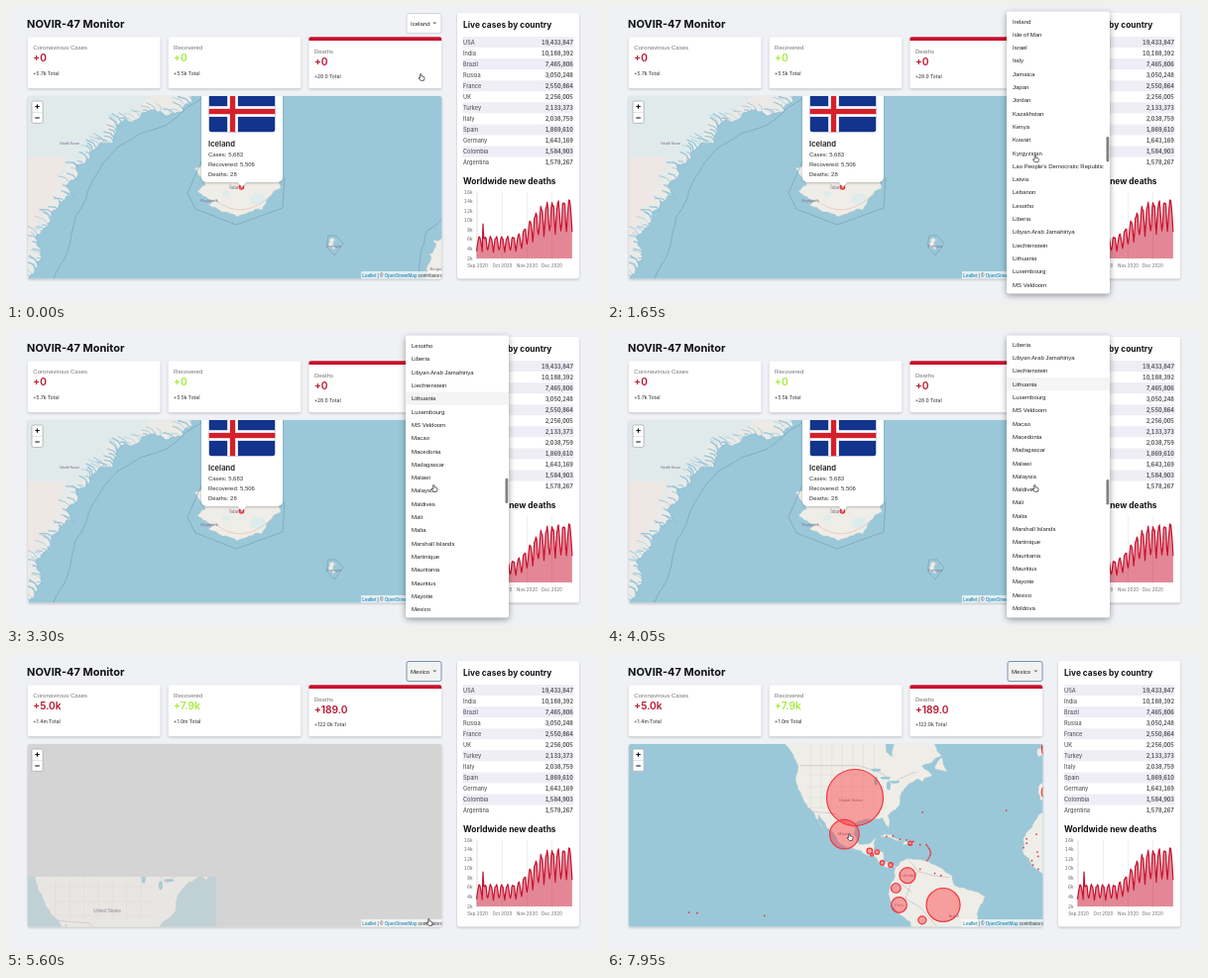
An HTML page that plays this animation: 600x299 px, repeating every 8000 ms.

```html
<!DOCTYPE html>
<html lang="en">
<head>
<meta charset="utf-8">
<title>Case dashboard</title>
<style>
html, body { margin: 0; width: 100%; height: 100%; overflow: hidden; background: #eff1f5; }
svg { display: block; width: 600px; height: 299px; }
text { font-family: "Liberation Sans", Arial, sans-serif; white-space: pre; }
.ui { font-family: Inter, sans-serif; }
.count { font-variant-numeric: tabular-nums; text-anchor: end; }
.card { fill: #fff; filter: drop-shadow(0 1px 1px rgba(0,0,0,.22)); }
.land { fill: #efede7; stroke: #b4c4c6; stroke-width: .4; }
.lake { fill: #9ac8d9; }
.sealine { fill: none; stroke: #7898ac; stroke-width: .6; }
.state { fill: none; stroke: #dbd4d7; stroke-width: .4; }
.border { fill: none; stroke: #b9a8b8; stroke-width: .5; }
.place { fill: #7d6884; text-anchor: middle; }
.spot { fill: #ff3038; fill-opacity: .42; stroke: #f0353c; stroke-width: 1.2; }
.dot { fill: #e3383f; }
.hidden { display: none; }
</style>
</head>
<body>
<svg id="stage" viewBox="0 0 600 299"></svg>
<script>
const LOOP = 8000, ROW = 13.3, SEA = '#9ac8d9', RED = '#c8102e';
const clamp = v => Math.min(1, Math.max(0, v));
const smooth = v => (v = clamp(v), v * v * (3 - 2 * v));
const span = (t, from, to) => clamp((t - from) / (to - from));
const times = (n, fn) => Array.from({ length: n }, (_, i) => fn(i)).join('');

function seeded(seed) {
  return () => (seed = (seed * 16807) % 2147483647) / 2147483647;
}

const rect = (x, y, w, h, fill, extra = '') =>
  `<rect x="${x}" y="${y}" width="${w}" height="${h}" fill="${fill}" ${extra}/>`;
const text = (x, y, str, size, fill = '#333', extra = '') =>
  `<text x="${x}" y="${y}" font-size="${size}" fill="${fill}" ${extra}>${str}</text>`;
const ui = (x, y, str, size, fill, weight = 400, cls = '', extra = '') =>
  text(x, y, str, size, fill, `class="ui ${cls}" font-weight="${weight}" ${extra}`);
const place = ([x, y], str, size = 4) => text(x, y + 1.4, str, size, '', 'class="place"');
const dot = ([x, y]) => `<circle class="dot" cx="${x}" cy="${y}" r=".9"/>`;
const line = (pts, cls, extra = '') => `<polyline points="${pts.join(' ')}" class="${cls}" ${extra}/>`;
const parse = str => str.split(' ').map(p => p.split(',').map(Number));

// Web Mercator view that puts longitude lon0 and latitude lat0 at x0, y0.
function mercator(scale, lon0, lat0, x0, y0) {
  const psi = lat => Math.log(Math.tan(Math.PI / 4 + lat * Math.PI / 360)) * 180 / Math.PI;
  return ([lon, lat]) => [x0 + (lon - lon0) * scale, y0 - (psi(lat) - psi(lat0)) * scale];
}

// Breaks a plain outline into a natural looking coast.
function rough(pts, amount = .15, depth = 3) {
  const rnd = seeded(41 + pts.length);
  for (let k = 0; k < depth; k++) {
    pts = pts.flatMap((p, i) => {
      const q = pts[i + 1];
      if (!q) return [p];
      const shift = (rnd() - .5) * amount * 2;
      const dx = q[0] - p[0], dy = q[1] - p[1];
      return [p, [(p[0] + q[0]) / 2 - dy * shift, (p[1] + q[1]) / 2 + dx * shift]];
    });
  }
  return pts.map(p => p.map(v => +v.toFixed(1)));
}
const land = (pts, amount, extra = '') =>
  `<polygon class="land" points="${rough(pts, amount).join(' ')}" ${extra}/>`;

function fjords(coast) {
  const rnd = seeded(77);
  return coast.map(([x, y]) => {
    const dx = 3 + rnd() * 10, dy = 2 + rnd() * 9;
    return line([[x + 1, y + 1], [x + 2 - dx / 2, y - 1 - dy / 2], [x - dx, y - dy]], '',
      `fill="none" stroke="#97c5da" stroke-width="${.5 + rnd()}"`);
  }).join('');
}

function popup() {
  const u = 2.67, flagX = 204.5, crossX = flagX + 7 * u, crossY = 101.2;
  return '<g class="card"><rect x="197" y="80" width="82" height="98" rx="5"/><path d="M233 177h10l-5 6z"/></g>' +
    `<g clip-path="url(#flagClip)">${rect(flagX, 84, 67, 44, '#13348c')}
      ${rect(flagX, crossY, 67, 4 * u, '#fff')}${rect(crossX, 84, 4 * u, 44, '#fff')}
      ${rect(flagX, crossY + u, 67, 2 * u, '#d5202b')}${rect(crossX + u, 84, 2 * u, 44, '#d5202b')}</g>` +
    ui(204, 141.6, 'Iceland', 7.6, '#333', 700) +
    ['Cases: 5,683', 'Recovered: 5,506', 'Deaths: 28'].map((s, i) => text(204, 151.6 + i * 10, s, 5.95)).join('');
}

function icelandMap() {
  const coast = rough(parse('190,84 152,107 111,121 91,144 71,166 46,211 35,246 20,278'), .3, 5);
  const ice = rough(parse('150,86 104,112 62,160 38,212 20,240'));
  const island = parse('190,164 235,157 271,169 277,184 258,206 233,213 204,201 211,196 193,187 201,181 190,164');
  const faroe = parse('326,236 333,236 331,246 326,236');
  return rect(22, 91, 418, 185, SEA) +
    `<polygon points="20,86 ${coast.join(' ')}" fill="#ebeae6"/>` +
    `<polygon points="20,86 ${ice.join(' ')}" fill="#e0eaeb"/>` +
    '<path d="M20 153h42L34 216l-14 22z" fill="#eee7e3"/>' +
    fjords(coast.filter((_, i) => i % 3 === 0)) +
    line(coast, '', 'fill="none" stroke="#8cbdd4" stroke-width=".8"') +
    line(rough(parse('205,86 112,143 70,213 47,278'), .06), 'sealine') +
    place([64, 139], 'Kalaallit Nunaat', 2.8) +
    land(island) +
    '<g fill="#dfecec"><ellipse cx="254" cy="195" rx="8" ry="6"/><ellipse cx="222" cy="190" rx="4" ry="3"/></g>' +
    '<path d="M211 196q27 22 57-5" fill="none" stroke="#e6b9a4" stroke-width=".6"/>' +
    line(parse('198,155 183,189 191,205 232,221 279,204 281,173'), 'sealine') +
    place([205, 196.5], 'Reykjavík') + place([232, 184], 'Ísland', 5) +
    land(faroe, .3) + '<path class="sealine" d="M325 232h8l7 8-9 12-8-9z"/>' + place([331, 243], 'Føroyar') +
    land(parse('442,226 431,236 427,250 430,280 442,280'), .3) +
    line(rough(parse('440,214 425,226 416,278'), .08), 'sealine') + place([434, 266], 'Bergen') +
    '<circle cx="237.5" cy="183" r="2.2" class="spot"/>' + popup();
}

// Coasts as longitude,latitude key points.
const COASTS = [
  '-134,58 -130,55 -124,49 -124,41 -117,32.5 -110,23 -114.5,31.5 -105.5,20.5 -95,15.8 -87.5,13 -83,8.3 -77.5,8 -83.5,11 -83.5,15 -88,16 -87,21.4 -91,18.7 -95,18.5 -97.6,23 -97,28 -89,29.3 -84,30 -81,25.2 -81.3,31 -75.7,35.3 -74,40.5 -67,44.7 -65,43.6 -60,46 -65,49 -60,50.2 -55.7,52 -62,58 -77,58 -79,51.5 -82,53 -83,58',
  '-77.5,8 -72,12 -62,10.5 -51,4 -50,0 -44,-2.5 -35,-6 -39,-14 -41,-24 -70,-24 -70.5,-18 -76,-14 -81,-5 -80,0 -77.5,8',
  '-5,35.5 -9.8,31 -17,21 -17,14.5 -13,9 -7.5,4.5 -5,5',
  '-6,43.5 -9,43 -9,37 -6,36.5', '-6,54.5 -10,54 -10,51.6 -6,52', '-59,48 -55.5,51.5 -53,47',
  '-85,22 -80,23 -74.5,20.2 -80,21.5', '-74,19.5 -68.5,18.6 -74,18.2'
].map(parse);
const LAKES = parse('-87,47.6 -87,44 -82.5,45 -81,42.3 -78,43.6');
const BORDERS = ['-123,49 -95,49 -84,46.5 -79,43 -75,45 -68,47', '-117,32.5 -106,31.7 -103,29 -97,26',
  '-72,12 -67,6 -70,1 -73,-7 -66,-11 -58,-20', '-80,-3 -75,0 -70,-4', '-67,6 -60,4 -52,3'].map(parse);

function americas(view) {
  const stroke = (pts, cls) => line(pts.map(view), cls);
  return COASTS.map(c => land(c.map(view), .12)).join('') +
    times(7, i => stroke([[-118 + i * 5, 33], [-118 + i * 5, 56]], 'state')) +
    times(4, i => stroke([[-120, 34 + i * 4], [-82, 34 + i * 4]], 'state')) +
    BORDERS.map(b => stroke(b, 'border')).join('') +
    LAKES.map((p, i) => {
      const [x, y] = view(p);
      return `<ellipse class="lake" cx="${x}" cy="${y}" rx="${i % 2 ? 2 : 5}" ry="${i % 2 ? 4.5 : 1.4}"/>`;
    }).join('');
}

// longitude,latitude,radius
const CASES = parse('-97,38,28.5 -102,23,14.8 -55,-10,17 -72,4,8 -76,-10,7.8 -77.5,-2,4.8 -65,-17,4 -90,15.5,2.8 -86.5,15,2.3 -88.9,13.8,1.5 -84,10,2.2 -80,9,2.4 -70.7,19,2 -4,40,9 -2,54,13');

function caseMap() {
  const view = mercator(2.12, -97, 38, 250, 145);
  const rnd = seeded(15);
  const label = (lon, lat, name) => place(view([lon, lat]), name);
  return rect(22, 91, 418, 185, SEA) + americas(view) +
    label(-99, 37.2, 'United States') + label(-102, 23.2, 'México') + label(-72, 4, 'Colombia') +
    label(-76, -10, 'Perú') + label(-50, -15, 'Brasil') +
    CASES.map(c => {
      const [x, y] = view(c);
      return `<circle class="spot" cx="${x}" cy="${y}" r="${c[2]}"/>`;
    }).join('') +
    times(10, i => dot(view([-63 + 2 * Math.sin(i / 3), 18.3 - i * .8]))) +
    times(6, i => dot(view([-82 + i * 3.2, 22 - i * .8 + rnd()]))) +
    times(9, i => dot(view([-17 + rnd() * 9, 23 - i * 2]))) +
    parse('-64.8,32.3 -25,33 -66,7 -59,5 -56,4 -176,-13.5 -172,-13.8 -140,-15').map(p => dot(view(p))).join('');
}

function loadingMap() {
  const view = mercator(2.87, -97, 38, 110, 250);
  return rect(22, 91, 418, 185, '#d4d4d4') +
    `<g id="tile" clip-path="url(#tileClip)">${rect(22, 225, 190, 51, '#b9d0d5')}${americas(view)}
    ${place([102, 260], 'United States', 4.6)}</g>`;
}

function chart() {
  const days = 120, yOf = v => 255 - (v - 2) * 67 / 14;
  const pts = Array.from({ length: days }, (_, d) => {
    const mean = 5 + 5.4 * smooth((d - 45) / 45) + Math.max(0, d - 90) * .02;
    const weekly = 1 - 2 * Math.cos(Math.PI * (d - days + 1) / 7) ** 4;
    const value = d === 8 ? 9.3 : mean * (1 + .29 * weekly + .05 * Math.sin(d * 2.3));
    return [(474.5 + d * .81).toFixed(1), yOf(value).toFixed(1)];
  });
  const months = ['Sep', 'Oct', 'Nov', 'Dec'].map((m, i) => {
    const x = 475.5 + i * 25;
    return rect(x, 188, .5, 69, '#dedede') + ui(x, 263.5, `${m} 2020`, 4.5, '#666', 400, '', 'text-anchor="middle"');
  }).join('');
  const scale = times(8, i => ui(470.5, yOf(2 + 2 * i) + 1.5, `${2 + 2 * i}k`, 4.7, '#666', 400, 'count'));
  return months + scale + rect(474, 188, .5, 67, '#ddd') +
    `<polygon points="474.5,255 ${pts.join(' ')} 570.9,255" fill="${RED}" fill-opacity=".5"/>` +
    line(pts, '', `fill="none" stroke="${RED}" stroke-width="1.2" stroke-linejoin="round"`);
}

function sidePanel() {
  const rows = ['USA 19,433,847', 'India 10,188,392', 'Brazil 7,465,806', 'Russia 3,050,248', 'France 2,550,864', 'UK 2,256,005', 'Turkey 2,133,373', 'Italy 2,038,759', 'Spain 1,869,610', 'Germany 1,643,169', 'Colombia 1,584,903', 'Argentina 1,578,267'];
  return '<rect class="card" x="455" y="7" width="123" height="268.5" rx="2"/>' +
    ui(461, 21.8, 'Live cases by country', 8.4, '#111', 700) +
    rows.map((row, i) => {
      const [name, count] = row.split(' '), y = 36.5 + i * 11.06;
      return (i % 2 ? '' : rect(460.5, y - 5.5, 112, 11, '#efeef6')) +
        ui(461, y + 2, name, 5.6, '#55595e', 500) + ui(572, y + 2, count, 5.6, '#55595e', 700, 'count');
    }).join('') +
    ui(461, 179.8, 'Worldwide new deaths', 8.4, '#111', 700) + chart();
}

const STATS = [
  { name: 'Coronavirous Cases', color: '#b8152f', before: ['+0', '+5.7k'], after: ['+5.0k', '+1.4m'] },
  { name: 'Recovered', color: '#a4ec3c', before: ['+0', '+5.5k'], after: ['+7.9k', '+1.0m'] },
  { name: 'Deaths', color: '#b8152f', active: true, before: ['+0', '+28.0'], after: ['+189.0', '+122.0k'] }
];
const statCards = STATS.map(({ name, color, active }, i) => {
  const x = 21.8 + i * 141.8, dy = active ? 3.6 : 0;
  return `<rect class="card" x="${x}" y="31.3" width="133.8" height="52" rx="2"/>` +
    (active ? `<path d="M${x} 35v-1.9q0-1.8 2-1.8h129.8q2 0 2 1.8v1.9z" fill="${RED}"/>` : '') +
    text(x + 5.5, 44.1 + dy, name, 6.05, '#757575') +
    ui(x + 5.5, 56.1 + dy, '', 10.2, color, 600, '', `id="new${i}"`) +
    ui(x + 5.5, 69.8 + dy, '', 4.9, '#55595e', 600, '', `id="total${i}"`);
}).join('');

const COUNTRIES = `Guadeloupe|Guatemala|Guinea|Guinea-Bissau|Guyana|Haiti|Holy See (Vatican City State)|Honduras|Hong Kong|Hungary|Iceland|India|Indonesia|Iran|Iraq|Ireland|Isle of Man|Israel|Italy|Jamaica|Japan|Jordan|Kazakhstan|Kenya|Kuwait|Kyrgyzstan|Lao People's Democratic Republic|Latvia|Lebanon|Lesotho|Liberia|Libyan Arab Jamahiriya|Liechtenstein|Lithuania|Luxembourg|MS Veldoorn|Macao|Macedonia|Madagascar|Malawi|Malaysia|Maldives|Mali|Malta|Marshall Islands|Martinique|Mauritania|Mauritius|Mayotte|Mexico|Moldova|Monaco`.split('|');
const rowTop = i => 14.2 + (i - .5) * ROW;

const menu = `<g id="menu"><rect x="403" y="5.5" width="104" height="285" rx="2" fill="#fff"
    style="filter:drop-shadow(0 2px 3px rgba(0,0,0,.38))"/>
  <g clip-path="url(#menuClip)"><g id="list">
    ${rect(403, rowTop(COUNTRIES.indexOf('Iceland')), 104, ROW, '#ebebeb')}
    ${rect(403, 0, 104, ROW, '#f4f4f4', 'id="hover"')}
    ${COUNTRIES.map((c, i) => text(409, rowTop(i) + 8.8, c, 6.02, '#212121')).join('')}
  </g></g>${rect(503.5, 113, 2.8, 25.5, '#808080', 'rx="1.4" id="thumb"')}</g>`;

const cursor = `<g id="cursor">
  <path id="hand" d="M-1.3-3.2q.8-.9 1.3.1v1.9l2.2.5q1 .4.8 1.6l-.6 2.4h-3.2l-2-2.3q-.3-1 .8-.7l.7.5z" fill="#fff" stroke="#222" stroke-width=".7"/>
  <path id="beam" d="M-1-3.2q1 0 1 .8v4.8q0 .8-1 .8M1-3.2q-1 0-1 .8v4.8q0 .8 1 .8" fill="none" stroke="#333" stroke-width=".5"/></g>`;

const clip = (id, x, y, w, h, r = 0) =>
  `<clipPath id="${id}">${rect(x, y, w, h, '#000', `rx="${r}"`)}</clipPath>`;
const link = s => `<tspan fill="#0078a8">${s}</tspan>`;

document.getElementById('stage').innerHTML =
  `<defs>${clip('mapClip', 22, 91, 417.5, 184.5, 2)}${clip('flagClip', 204.5, 84, 67, 43.3, 3)}
    ${clip('tileClip', 22, 225, 190, 51)}${clip('menuClip', 403, 5.5, 104, 285, 2)}</defs>` +
  rect(0, 0, 600, 299, '#eff1f5') +
  ui(21, 21.8, 'NOVIR-47 Monitor', 11, '#111', 700) +
  rect(404, 7.5, 35, 20, '#fff', 'id="select" rx="2" stroke-width=".8"') +
  text(408, 19.6, '', 6.05, '#222', 'id="choice"') + '<path d="M430.3 16.6h4l-2 2z" fill="#757575"/>' +
  statCards + '<rect class="card" x="22" y="91" width="417.5" height="184.5" rx="2"/>' +
  `<g clip-path="url(#mapClip)"><g id="iceland">${icelandMap()}</g><g id="loading">${loadingMap()}</g>
    <g id="americas">${caseMap()}</g>
    ${rect(358, 268, 82, 8, '#fff', 'fill-opacity=".7"')}
    ${text(359.3, 273.6, `${link('Leaflet')} | © ${link('OpenStreetMap')} contributors`, 4.65)}</g>` +
  rect(26, 96, 11.2, 22.4, '#fff', 'rx="1.5" stroke="#aaa" stroke-width=".8"') + rect(26, 107, 11.2, .5, '#ccc') +
  '<path d="M29.4 101.6h4.4M31.6 99.4v4.4M29.4 113h4.4" stroke="#000" stroke-width="1"/>' +
  sidePanel() + menu + cursor;

const $ = id => document.getElementById(id);
const show = (id, on) => $(id).classList.toggle('hidden', !on);
const set = (id, attrs) => Object.entries(attrs).forEach(([k, v]) => $(id).setAttribute(k, v));

// Each move eases by dx, dy between two times.
const MOVES = [
  { from: 100, to: 500, dx: 5, dy: -54 }, { from: 820, to: 1080, dx: 10, dy: 116 },
  { from: 1300, to: 1800, dx: -2, dy: 26 }, { from: 4300, to: 4950, dx: -5, dy: 111 },
  { from: 6700, to: 7600, dx: -182, dy: -86 }
];
const cursorAt = t => MOVES.reduce(([x, y], m) => {
  const p = smooth(span(t, m.from, m.to));
  return [x + m.dx * p, y + m.dy * p];
}, [419, 72]);

// Momentum scroll that settles at the end of the range.
function scrollAt(t) {
  const length = 2900, decay = ms => 1 - Math.exp(-ms / 750);
  return 398.5 * decay(length * span(t, 1150, 1150 + length)) / decay(length);
}

function render(t) {
  const [x, y] = cursorAt(t), scroll = scrollAt(t);
  const opened = t >= 720, chosen = t >= 5250, updated = t >= 5450;
  const overText = t >= 5800 && t < 6750;
  set('cursor', { transform: `translate(${x} ${y})` });
  show('hand', !overText);
  show('beam', overText);

  const grow = 1 - (1 - span(t, 720, 980)) ** 3;
  const fade = span(t, 5200, 5400);
  show('menu', opened && fade < 1);
  set('menu', {
    opacity: Math.min(1, grow * 1.2) * (1 - fade),
    transform: `translate(455 148) scale(${.75 + .25 * grow} ${.56 + .44 * grow}) translate(-455 -148)`
  });
  set('list', { transform: `translate(0 ${-scroll})` });
  set('thumb', { y: 113 + scroll * .0955 });
  const hovered = t < 4350 ? COUNTRIES.indexOf('Lithuania') : Math.floor((y - 4 + scroll - rowTop(0)) / ROW);
  show('hover', t >= 2050);
  set('hover', { y: rowTop(hovered) });

  $('choice').textContent = chosen ? 'Mexico' : 'Iceland';
  set('select', { stroke: opened ? '#5f7a99' : '#c8c9cd', fill: opened ? '#f2f2f3' : '#fff' });
  STATS.forEach((s, i) => {
    const [fresh, total] = updated ? s.after : s.before;
    $('new' + i).textContent = fresh;
    $('total' + i).textContent = total + ' Total';
  });

  show('iceland', !updated);
  show('loading', updated && t < 6100);
  set('tile', { opacity: .75 * span(t, 5480, 5600) });
  show('americas', t >= 5900);
  set('americas', { opacity: span(t, 5900, 6100) });
}

const start = performance.now();
function tick() {
  render((performance.now() - start) % LOOP);
  requestAnimationFrame(tick);
}
tick();
</script>
</body>
</html>
```
